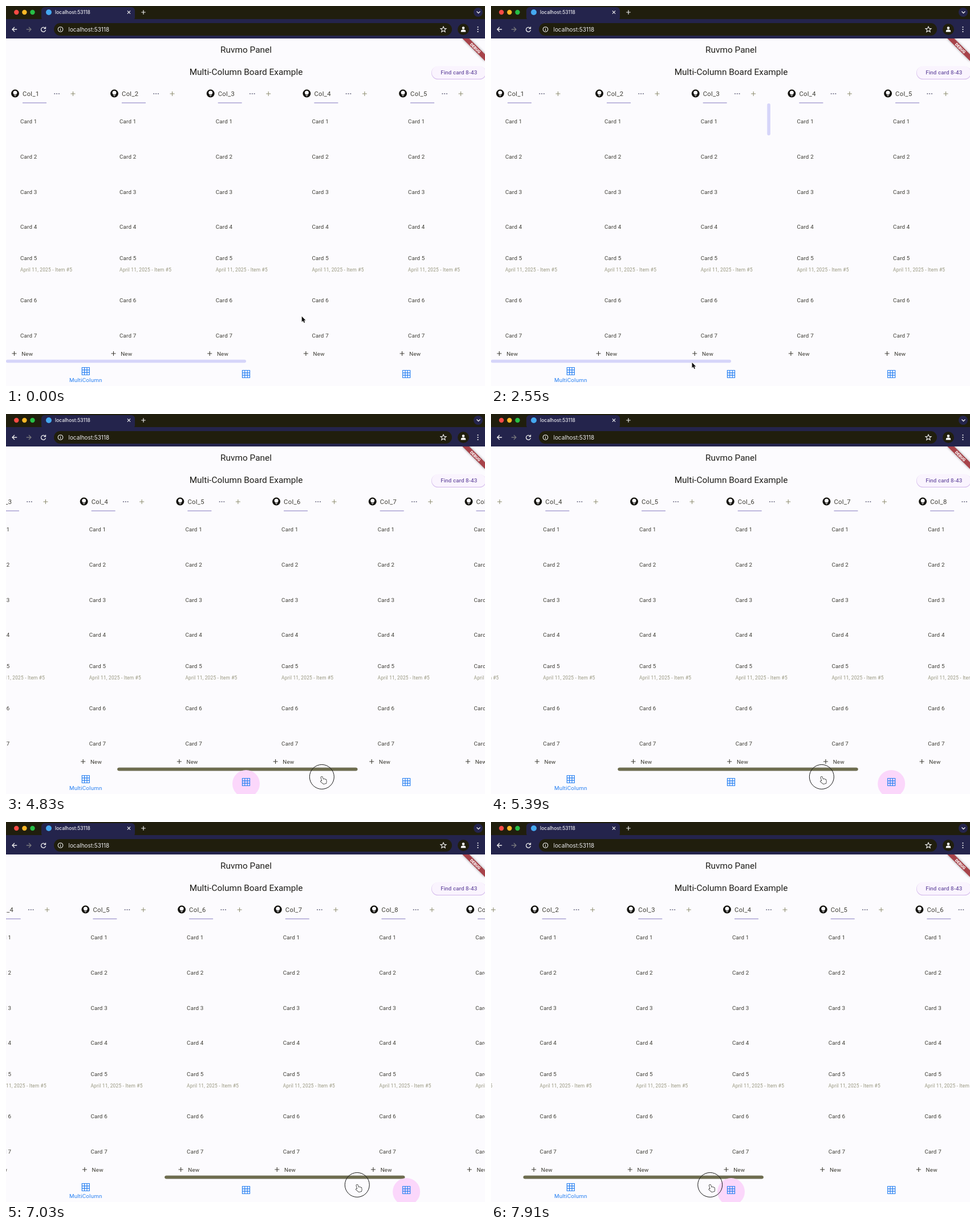
Animation, 840 px wide and 667 px high, one loop 8 s. Source, as an HTML page with a canvas:

```html
<!DOCTYPE html>
<html lang="en">
<head>
<meta charset="utf-8">
<title>Multi-Column Board</title>
<style>
  html, body { margin: 0; width: 100%; height: 100%; overflow: hidden; background: #fcfbfe; }
  canvas { display: block; }
</style>
</head>
<body>
<canvas id="stage" width="840" height="667"></canvas>
<script>
const ctx = document.getElementById('stage').getContext('2d');
const LOOP = 8000;
const BLUE = '#2a82f2', INK = '#3c3b33', NAVY = '#24244c', DARK = '#201e0d', LAVENDER = '#d6d5f9';
const BULB = 'M0-10A10 10 0 1 0 0 10A10 10 0 1 0 0-10ZM0 7C-.8 7-1.5 6.3-1.5 5.5H1.5C1.5 6.3.8 7 0 7ZM3 4.5H-3V3H3ZM3 2H-3C-4.2 1.1-5-.4-5-2A5 5 0 0 1 5-2C5-.4 4.2 1.1 3 2Z';

// Scrollbar thumb: time in ms, position in px, speed in px/s
const DRAG = [[4090, 0, 0], [4250, 22.9, 130], [4830, 195.3, 60], [5930, 259.7, 100], [7030, 278.5, -150], [7910, 56.7, -250]];

const clamp = v => Math.min(1, Math.max(0, v));
const ramp = (t, from, to) => clamp((t - from) / (to - from));
const ease = (t, from, to) => { const p = ramp(t, from, to); return p * p * (3 - 2 * p); };
const mix = (a, b, p) => a + (b - a) * p;

// Cubic Hermite interpolation, giving position and speed
function thumbAt(t) {
  if (t <= DRAG[0][0]) return { pos: 0, speed: 0 };
  t = Math.min(t, 7910);
  const i = DRAG.findIndex((k, n) => n > 0 && t <= k[0]);
  const [t0, p0, v0] = DRAG[i - 1], [t1, p1, v1] = DRAG[i];
  const d = (t1 - t0) / 1000, s = (t - t0) / (t1 - t0), m0 = v0 * d, m1 = v1 * d;
  const a = 2 * p0 + m0 - 2 * p1 + m1, b = -3 * p0 - 2 * m0 + 3 * p1 - m1;
  return { pos: ((a * s + b) * s + m0) * s + p0, speed: ((3 * a * s + 2 * b) * s + m0) / d };
}

function text(str, x, y, size, color = INK, { font = 'Roboto', weight = 400, spacing = 0, align = 'left' } = {}) {
  ctx.font = `${weight} ${size}px ${font}, sans-serif`;
  ctx.letterSpacing = spacing + 'px';
  ctx.textAlign = align;
  ctx.fillStyle = color;
  ctx.fillText(str, x, y);
}

function box(x, y, w, h, color, radius = 0) {
  ctx.fillStyle = color;
  ctx.beginPath();
  ctx.roundRect(x, y, w, h, radius);
  ctx.fill();
}

function dot(x, y, r, color) {
  ctx.fillStyle = color;
  ctx.beginPath();
  ctx.arc(x, y, r, 0, 7);
  ctx.fill();
}

function stroke(path, x, y, color, width = 1) {
  ctx.save();
  ctx.translate(x, y);
  ctx.strokeStyle = color;
  ctx.lineWidth = width;
  ctx.stroke(new Path2D(path));
  ctx.restore();
}

function shape(path, x, y, fill, line, width) {
  ctx.save();
  ctx.translate(x, y);
  const p = new Path2D(path);
  ctx.strokeStyle = line;
  ctx.lineWidth = width;
  ctx.lineJoin = 'round';
  ctx.stroke(p);
  ctx.fillStyle = fill;
  ctx.fill(p);
  ctx.restore();
}

function bulb(x, y) {
  ctx.save();
  ctx.translate(x, y);
  ctx.scale(0.7, 0.7);
  ctx.fillStyle = '#12110c';
  ctx.fill(new Path2D(BULB), 'evenodd');
  ctx.restore();
}

const plus = (x, y, r, color, width) => stroke(`M${-r} 0H${r}M0 ${-r}V${r}`, x, y, color, width);

function column(index) {
  const x = index ? 199 + 168.7 * (index - 1) : 25;
  bulb(x - 9, 153.6);
  text('Col_' + (index + 1), x + 4, 157.5, 11.2, INK, { spacing: 0.35 });
  box(x + 4, 169.6, 42, 1, '#8478c0');
  for (let i = 0; i < 3; i++) dot(x + 60.3 + i * 3.8, 154, 1.1, '#74738a');
  plus(x + 92.5, 154, 4, '#8b8a6c');
  [202, 264, 326, 387.7, 442.3, 516.3, 578].forEach((y, i) =>
    text('Card ' + (i + 1), x, y + 3.6, 9.8, INK, { spacing: 0.175 }));
  text('April 11, 2025 - Item #5', x, 465.6, 8.4, '#98977f', { spacing: 0.2 });
  plus(x - 10.5, 610, 4, INK, 1.1);
  text('New', x + 2.2, 613.6, 9.8, INK, { spacing: 0.175 });
}

function banner() {
  ctx.save();
  ctx.translate(840, 57);
  ctx.rotate(Math.PI / 4);
  ctx.shadowColor = '#0006';
  ctx.shadowBlur = 4;
  box(-28, 19.6, 56, 8.4, '#a8434a');
  ctx.shadowBlur = 0;
  text('DEBUG', 0, 26.4, 7.1, '#fff', { weight: 900, align: 'center' });
  ctx.restore();
}

function browser() {
  box(0, 0, 840, 23, DARK);
  box(62, 2, 164, 24, NAVY, 6);
  box(0, 23, 840, 34, NAVY);
  box(84, 30, 698, 22, DARK, 11);
  ['#fe4b45', '#fdb726', '#27bf46'].forEach((c, i) => dot(18.3 + i * 14.1, 11, 4.2, c));
  dot(75, 11, 5, '#45a8f0');
  text('localhost:53118', 86, 14, 8.45, '#e9e9ee', { font: 'Inter', weight: 500 });
  stroke('M-2.6-2.6L2.6 2.6M2.6-2.6L-2.6 2.6', 215.5, 11, '#eee', 1.2);
  plus(241, 11, 3.8, '#eee', 1.2);
  dot(828, 11, 8, NAVY);
  stroke('M-3-1.5L0 1.5L3-1.5', 828.5, 11, '#eee', 1.3);
  stroke('M4.2 0H-4M0-4L-4 0L0 4', 15, 41, '#eee', 1.3);
  stroke('M-4.2 0H4M0-4L4 0L0 4', 40, 41, '#77777c', 1.3);
  stroke('M3.2-2.2A4 4 0 1 0 4 1M4-4.5V-1.4H.8', 65.5, 41, '#eee', 1.3);
  stroke('M-4.3 0A4.3 4.3 0 1 0 4.3 0A4.3 4.3 0 1 0-4.3 0M0-.6V2.4M0-2.5V-1.4', 95.5, 41, '#eee', 1.1);
  text('localhost:53118', 109.5, 44.6, 9.95, '#ececf0', { font: 'Inter' });
  stroke('M0-5L1.5-1.6L5-1.4L2.3 .9L3.2 4.5L0 2.5L-3.2 4.5L-2.3 .9L-5-1.4L-1.5-1.6Z', 767, 41, '#eee', 1.1);
  dot(802, 41, 10, DARK);
  dot(802, 38.6, 2.3, '#fff');
  box(797.8, 41.6, 8.4, 4, '#fff', [3, 3, 0.5, 0.5]);
  for (const y of [37, 41, 45]) dot(827.5, y, 1.1, '#eee');
}

function navIcon(x, y, hover) {
  if (hover > 0) {
    ctx.globalAlpha = hover;
    dot(x, 649, 24, '#fbd7fb');
    ctx.globalAlpha = 1;
  }
  stroke('M-6.5-6.5H6.5V6.5H-6.5ZM-2.2-6.5V6.5M2.2-6.5V6.5M-6.5-2.2H6.5M-6.5 2.2H6.5', x, y, BLUE, 1.2);
}

function pointer(x, y, t) {
  const r = 21.5 * ramp(t, 4090, 4310);
  if (r > 0) stroke(`M${-r} 0A${r} ${r} 0 1 0 ${r} 0A${r} ${r} 0 1 0 ${-r} 0`, x, y, '#1a1a1a', 1);
  if (y > 628.5)
    shape('M-.8 0C.4-.7 1.2.2 1.4 1.2L2.2 4.4L3 3.8L4.3 4.2L5.6 4.1L6.8 5L7.6 5.2L8 8.8L7.4 11.4L2.8 12.3L-1.8 8.4C-2.4 7.4-1.2 6.7-.3 7.3L.4 7.7L-1.4 1.4C-1.6.7-1.4.2-.8 0Z', x, y, '#fff', '#222', 1.5);
  else
    shape('M0 0V9.6L2.2 7.6L3.9 11.2L5.5 10.5L3.9 7H6.8Z', x, y, '#111', '#fff', 1.2);
}

function draw(t) {
  const thumb = thumbAt(t), glide = ease(t, 1870, 2540);
  const x = mix(518.7 - ease(t, 1030, 1170), 352.5, glide) + thumb.pos + 0.1 * thumb.speed;
  const y = mix(544.8, 625.7, glide) + 11.2 * ease(t, 4250, 4650);
  const onNav = clamp((y - 628) / 4), onThird = clamp((x - 556) / 8);

  box(0, 0, 840, 667, '#fcfbfe');
  text('Ruvmo Panel', 421, 82, 15.4, '#1f1e1a', { align: 'center' });
  text('Multi-Column Board Example', 421, 121.4, 15.4, '#1f1e1a', { align: 'center' });

  box(746, 106, 96, 23, '#d9c2ee', 11.5);
  box(746.7, 105.5, 94.6, 22.2, '#faf4fe', 11);
  text('Find card 8-43', 762.3, 120.2, 9.8, '#7057a6', { weight: 500, spacing: 0.07 });

  ctx.save();
  ctx.translate(-2 * thumb.pos, 0);
  for (let i = 0; i < 10; i++) column(i);
  ctx.globalAlpha = ramp(t, 2080, 2280) * (1 - ramp(t, 4400, 4700));
  box(484.3, 171, 5.6, 56, LAVENDER, 2.8);
  ctx.restore();

  const track = (color, alpha) => {
    ctx.globalAlpha = alpha;
    box(thumb.pos, 620.7, 421, 5.6, color, 2.8);
    ctx.globalAlpha = 1;
  };
  track(LAVENDER, 1);
  track('#8a8970', ramp(t, 2560, 2760));
  track('#6e6d4f', ramp(t, 4090, 4200));

  navIcon(139.8, 641, 0);
  navIcon(421, 646, onNav * (1 - onThird));
  navIcon(702.2, 646, onNav * onThird);
  text('MultiColumn', 111, 660, 9.8, BLUE, { spacing: 0.175 });

  banner();
  browser();
  pointer(x, y, t);
}

const start = performance.now();
function tick() {
  draw((performance.now() - start) % LOOP);
  requestAnimationFrame(tick);
}
tick();
</script>
</body>
</html>
```
